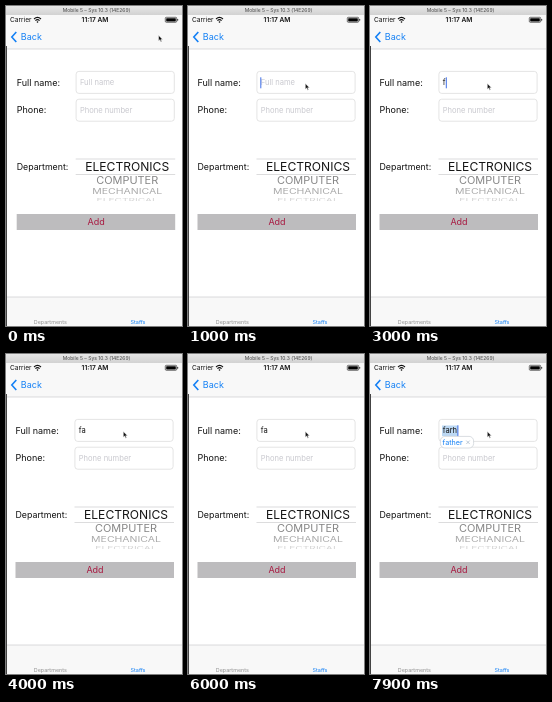
Animation of 176 by 320 pixels, one loop 8 s. Source, as an HTML page:

```html
<!DOCTYPE html>
<html lang="en">
<head>
<meta charset="utf-8">
<title>Staff form</title>
<style>
  html, body { margin: 0; width: 100%; height: 100%; overflow: hidden; background: #fff; }
  svg { display: block; width: 176px; height: 320px; }
  text { font-family: Inter, Roboto, sans-serif; font-size: 9px; fill: #111; }
  .mid { text-anchor: middle; }
  .blue { fill: #1480f5; }
  .title { font-size: 5px; fill: #444; }
  .status { font-size: 6.6px; }
  .input { font-size: 7.6px; }
  .hint { fill: #c9c9cf; }
  .tab { font-size: 5.45px; }
  .bar { fill: #f8f8f8; }
  .line { stroke: #c4c4c6; stroke-width: .6; }
  .box { fill: #fff; stroke: #dedede; stroke-width: .8; }
</style>
</head>
<body>
<svg viewBox="0 0 176 320">
  <defs>
    <linearGradient id="chrome" x2="0" y2="1">
      <stop stop-color="#e6e6e6"/><stop offset="1" stop-color="#d2d2d2"/>
    </linearGradient>
    <clipPath id="wheel"><rect x="68" y="140" width="102" height="55"/></clipPath>
  </defs>
  <rect width="176" height="320" fill="#fff"/>
  <rect class="bar" y="9" width="176" height="34"/>
  <path class="line" d="M0 43H176"/>
  <rect width="176" height="9" fill="url(#chrome)"/>
  <text class="title mid" x="90.5" y="6.2">Mobile 5 – Sys 10.3 (14E269)</text>

  <text class="status" x="4" y="16.3">Carrier</text>
  <g fill="none" stroke="#111" stroke-width="1.1">
    <path d="M28 13Q31.5 9.8 35 13M29.4 14.6Q31.5 12.7 33.6 14.6"/>
  </g>
  <circle cx="31.5" cy="16" r=".8"/>
  <text class="status mid" x="89" y="16.4" font-weight="600">11:17 AM</text>
  <rect x="159.3" y="11.3" width="11.4" height="5" rx="1" fill="none" stroke="#111" stroke-width=".6"/>
  <rect x="160.2" y="12.2" width="9.6" height="3.2" rx=".4"/>
  <rect x="171.3" y="12.9" width=".9" height="1.8" rx=".4"/>

  <path d="M10.3 26L5.8 31L10.3 36" fill="none" stroke="#1480f5" stroke-width="1.6"/>
  <text class="blue" x="14.8" y="34.3">Back</text>

  <g id="form">
    <text x="9.5" y="80">Full name:</text>
    <text x="9.5" y="107.3">Phone:</text>
    <text x="9.5" y="164.2" style="font-size:8.8px">Department:</text>
    <rect class="box" x="68.9" y="65.4" width="98.2" height="22" rx="2.8"/>
    <rect class="box" x="68.9" y="93.2" width="98.2" height="22" rx="2.8"/>
    <rect id="mark" x="72" y="71.5" width="16" height="10.5" fill="#bcd8f3"/>
    <text id="name" class="input" x="72.7" y="79.4"></text>
    <text class="input hint" x="72.7" y="106.9">Phone number</text>
    <g id="picker" clip-path="url(#wheel)"></g>
    <path class="line" d="M68.5 153H168M68.5 168.5H168"/>
    <rect x="9.5" y="208" width="158.5" height="16" fill="#bdbcbe"/>
    <text class="mid" x="89" y="219.3" style="fill:#a81c43">Add</text>
  </g>
  <rect id="caret" y="71.3" width="1" height="11" fill="#3f6fe8"/>
  <g id="bubble">
    <rect x="70.4" y="82.4" width="33.2" height="11.6" rx="4.5" fill="#fff" stroke="#c9ced4" stroke-width=".7"/>
    <text class="blue" x="72.6" y="90.8" style="font-size:7.2px">father</text>
    <path d="M96.3 86.6l3.4 3.4m0-3.4l-3.4 3.4" stroke="#a3b3c4" stroke-width=".7"/>
  </g>

  <rect class="bar" y="291" width="176" height="29"/>
  <path class="line" d="M0 291H176"/>
  <text class="tab mid" x="44.3" y="318" style="fill:#929292">Departments</text>
  <text class="tab mid blue" x="132" y="318">Staffs</text>
  <rect width="1" y="40" height="280" fill="#444"/>
  <path id="pointer" d="M0 0V5.6L1.4 4.4L2.4 6.6L3.3 6.2L2.4 4.1H4.2Z" fill="#111" stroke="#fff" stroke-width=".5"/>
</svg>
<script>
const LOOP = 8000, STEP = 100;
const $ = id => document.getElementById(id);

// label, baseline, font size, vertical squash, colour
const rows = [
  ['ELECTRONICS', 165.4, 12.1, 1, '#151515'],
  ['COMPUTER', 178, 10.95, .88, '#858585'],
  ['MECHANICAL', 188.2, 10.5, .7, '#a9a9a9'],
  ['ELECTRICAL', 196, 10.2, .45, '#d4d4d4']
];
$('picker').innerHTML = rows.map(([label, y, size, squash, color]) =>
  `<text class="mid" transform="translate(120 ${y}) scale(1 ${squash})"
    style="font-size:${size}px;fill:${color}">${label}</text>`).join('');

// time, typed text, caret x; each step restarts the blink
const typing = [
  [700, '', 72.3], [2700, 'f', 75.8], [3300, 'fa', 80.2],
  [6600, 'far', 83.1], [7400, 'farh', 87.4]
];
const pointerPath = [[0, 152.5, 29.3], [100, 141.7, 69], [200, 128, 76], [300, 117.3, 77.6]];
const SUGGEST_AT = 7800;

const latest = (table, t) => table.filter(row => row[0] <= t).pop();
const clamp = v => Math.max(0, Math.min(1, v));

function blink(elapsed) {
  const phase = elapsed % 1000 / 1000;
  return phase < .8 ? clamp((.68 - phase) / .12) : clamp((phase - .88) / .12);
}

function draw(now) {
  const t = Math.floor(now % LOOP / STEP) * STEP;
  const state = latest(typing, t);
  const text = state ? state[1] : '';
  $('name').textContent = text || 'Full name';
  $('name').classList.toggle('hint', !text);
  $('caret').setAttribute('x', state ? state[2] : 0);
  $('caret').setAttribute('opacity', state ? blink(t - state[0]) : 0);

  const suggesting = t >= SUGGEST_AT ? 1 : 0;
  $('mark').setAttribute('opacity', suggesting);
  $('bubble').setAttribute('opacity', suggesting);

  const [, x, y] = latest(pointerPath, t);
  $('pointer').setAttribute('transform', `translate(${x} ${y})`);
  $('form').setAttribute('transform', `translate(${t < 100 ? 1.2 : 0} 0)`);
}

const start = performance.now();
function tick() {
  draw(performance.now() - start);
  requestAnimationFrame(tick);
}
tick();
</script>
</body>
</html>
```
